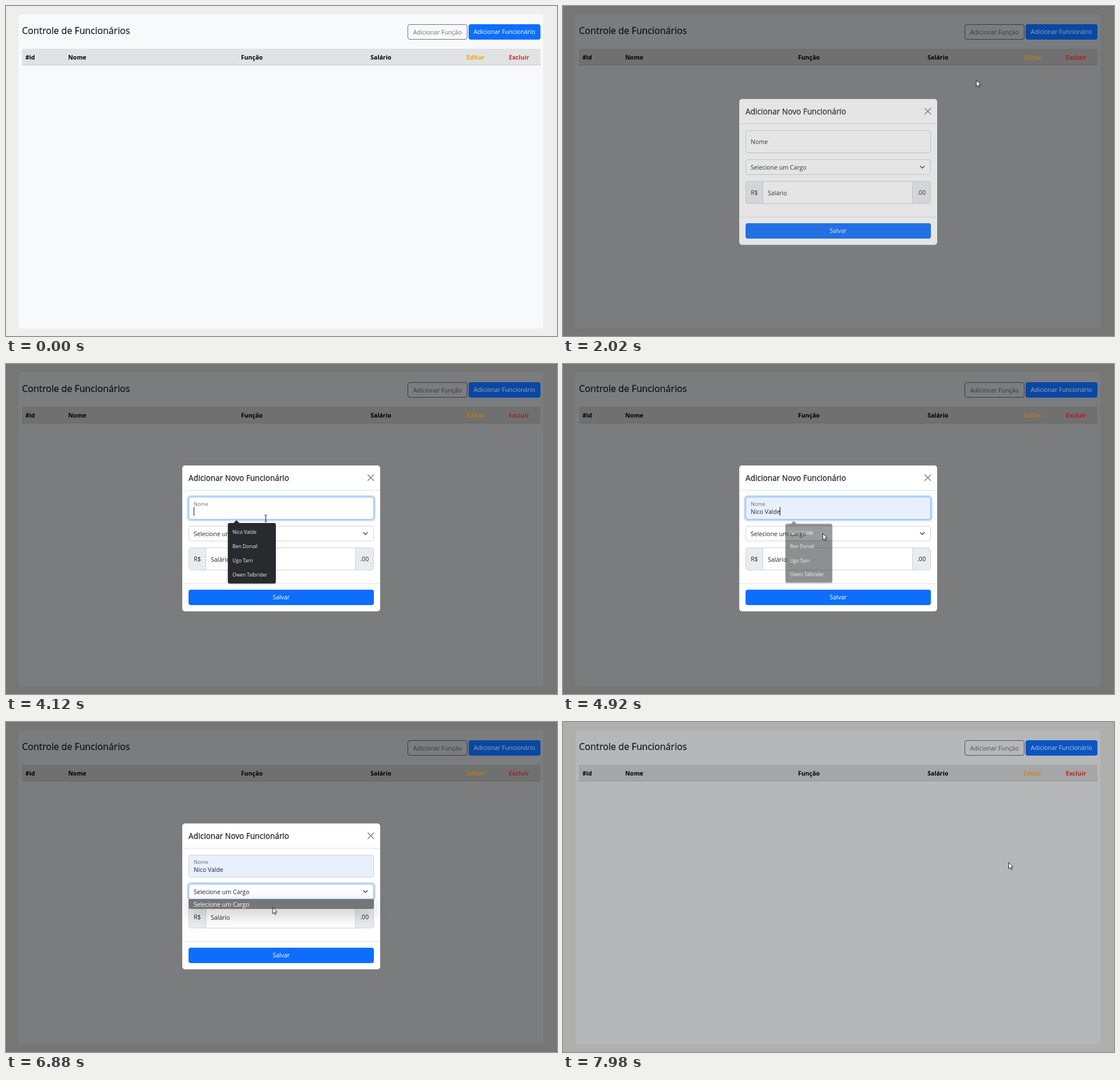
Write an HTML page that moves like this. It is 966 px wide and 579 px high and loops after 8000 ms.

```html
<!DOCTYPE html>
<html lang="pt-BR">
<head>
<meta charset="utf-8">
<title>Controle de Funcionários</title>
<style>
  html, body { margin: 0; width: 966px; height: 579px; overflow: hidden; }
  body { position: relative; background: #eee; color: #212529; font: 10.6px/20px "Open Sans", "Noto Sans", sans-serif; }
  div, span, svg { position: absolute; box-sizing: border-box; }
  svg { overflow: visible; fill: none; }

  /* Every part runs on the same 8 s clock: 1% = 80 ms */
  .anim { animation: 8s linear infinite; }
  .step { animation-timing-function: step-end; }

  /* --x: left edge, --y: middle of the line */
  .t { left: calc(var(--x) * 1px); top: calc(var(--y) * 1px - 10px); white-space: nowrap; }
  .layer { inset: 0; }
  .th { font-weight: 700; color: #000; }

  .card { left: 22px; top: 15px; width: 920px; height: 551px; border-radius: 4px; background: #f8f9fb; }
  /* A thin stroke stands in for a medium weight */
  .title, .heading { -webkit-text-stroke: .3px; }
  .title { font-size: 16.2px; }
  .heading { font-size: 13.7px; }
  .thead { left: 28px; top: 75px; width: 909px; height: 29px; background: #e1e2e3; border-bottom: 1px solid #c6c7c9; }
  .btn { border-radius: 4px; text-align: center; line-height: 27px; }
  .outline { left: 704px; top: 32px; width: 105px; height: 27px; border: 1px solid #6c757d; color: #6c757d; line-height: 26px; }
  .primary { background: #0d6efd; color: #fff; }
  .add { left: 811px; top: 32px; width: 126px; height: 27px; --dark: .65; --late: .81; }
  .save { left: 320px; top: 396px; width: 325px; height: 27px; }
  .lit { z-index: 2; animation-name: lit; }
  .edit { color: #eba624; }
  .del { color: #d6302f; }
  .edit, .del { --dark: .75; --late: .87; }

  .backdrop { z-index: 1; background: #000; animation-name: dim; }
  .modal { z-index: 3; animation-name: fade, slide; }
  .box { left: 309px; top: 178px; width: 347px; height: 256px; border-radius: 5px; background: #fff; }
  .rule { left: 309px; width: 347px; height: 1px; background: #dee2e6; }
  .field { left: 320px; width: 325px; border: 1px solid #ced4da; border-radius: 4px; background: #fff; }
  .name { top: 233px; height: 40px; }
  .select { top: 284px; height: 27px; }
  .group { top: 322px; height: 40px; overflow: hidden; }
  .addon { top: 0; height: 38px; background: #e9ecef; line-height: 39px; text-align: center; }
  .ring { background: none; border-color: #86b7fe; box-shadow: 0 0 0 2.8px rgba(13, 110, 253, .25); }
  .ring.name { animation-name: nameRing; }
  .ring.select { animation-name: selectRing; }
  .filled { background: #e8f0fe; animation-name: filled; }
  .typed { animation-name: filled; }
  .label { transform-origin: 0 50%; animation-name: label; }
  .caret { left: 329px; top: 251px; width: 1px; height: 15px; background: #111; animation-name: caret; }

  .tips { left: 389px; top: 279px; width: 84px; height: 106px; border-radius: 3px; background: #292a2d; color: #f1f3f4;
    font-size: 8.55px; box-shadow: 0 1px 3px rgba(0, 0, 0, .3); animation-name: tips; }
  .tips::before { content: ""; position: absolute; left: 9px; top: -5px; border: 6px solid transparent; border-top: 0; border-bottom-color: #292a2d; }
  .hover { left: 0; top: 4px; width: 84px; height: 25px; background: #3f4145; animation-name: hover; }
  .list { left: 320px; top: 311px; width: 325px; height: 16.5px; border-radius: 0 0 3px 3px; background: #767676; color: #fff;
    box-shadow: 0 9px 24px rgba(0, 0, 0, .25); animation-name: list; }

  .cursor { z-index: 4; left: 0; top: 0; animation-name: move; }
  .arrow { animation-name: arrow; }
  .beam { animation-name: beam; }

  @keyframes dim { 0%, 20.5% { opacity: 0 } 22.375%, 98.89% { opacity: .5 } 100% { opacity: .203 } }
  @keyframes lit {
    0%, 20.5% { filter: brightness(1) }
    22.375%, 98.89% { filter: brightness(var(--dark)) }
    100% { filter: brightness(var(--late)) }
  }
  @keyframes fade { 0%, 23.75% { opacity: 0 } 25.625%, 96.79% { opacity: 1 } 98.66%, 100% { opacity: 0 } }
  @keyframes slide {
    0% { transform: translateY(-35px) }
    23.75% { transform: translateY(-35px); animation-timing-function: ease-out }
    27.5%, 96.79% { transform: none }
    98.66%, 100% { transform: translateY(-25px) }
  }
  @keyframes nameRing { 0%, 32% { opacity: 0 } 33.875%, 69% { opacity: 1 } 70.875%, 100% { opacity: 0 } }
  @keyframes selectRing { 0%, 69.25% { opacity: 0 } 71.125%, 96% { opacity: 1 } 97.875%, 100% { opacity: 0 } }
  @keyframes label {
    0%, 32% { transform: none; opacity: 1 }
    33.25%, 100% { transform: translateY(-7.8px) scale(.86); opacity: .65 }
  }
  @keyframes filled { 0% { opacity: 0 } 51.9%, 100% { opacity: 1 } }
  @keyframes caret {
    0% { opacity: 0; transform: none }
    32.5% { opacity: 1; transform: none }
    39.5% { opacity: 0; transform: none }
    46% { opacity: 1; transform: none }
    51.9% { opacity: 0; transform: none }
    60.4% { opacity: 1; transform: translateX(51px) }
    67%, 100% { opacity: 0; transform: translateX(51px) }
  }
  @keyframes tips {
    0%, 33.75% { opacity: 0; transform: none }
    34.25%, 60.625% { opacity: 1; transform: none }
    62.5%, 100% { opacity: 0; transform: scale(.95) }
  }
  @keyframes hover { 0% { opacity: 0 } 52.5%, 100% { opacity: 1 } }
  @keyframes list { 0%, 71.6% { opacity: 0 } 73.5%, 94.5% { opacity: 1 } 95%, 100% { opacity: 0 } }
  @keyframes arrow { 0% { opacity: 0 } 4.25% { opacity: 1 } 30.6% { opacity: 0 } 51.6%, 100% { opacity: 1 } }
  @keyframes beam { 0% { opacity: 0 } 30.6% { opacity: 1 } 51.6%, 100% { opacity: 0 } }
  @keyframes move {
    0%, 4.25% { transform: translate(768px, 538px) }
    7.5% { transform: translate(802px, 370px) }
    10% { transform: translate(868px, 190px) }
    11.9% { transform: translate(897px, 95px) }
    14.125%, 16.875% { transform: translate(850px, 53px) }
    19.5%, 22.75% { transform: translate(853px, 45px) }
    25% { transform: translate(740px, 120px) }
    26.75%, 28% { transform: translate(635px, 185px) }
    31.25% { transform: translate(457px, 252px) }
    32.5%, 37.5% { transform: translate(455px, 257px) }
    39.5%, 50.625% { transform: translate(455px, 260px) }
    53.75%, 63.125% { transform: translate(455px, 297px) }
    68.125%, 69.375% { transform: translate(414px, 300px) }
    72.625% { transform: translate(412px, 313px) }
    78.75%, 79.75% { transform: translate(411px, 321px) }
    82.5% { transform: translate(350px, 318px) }
    89.75%, 90% { transform: translate(592px, 332px) }
    94%, 100% { transform: translate(781px, 246px) }
  }
</style>
</head>
<body>
  <div class="card"></div>
  <span class="t title" style="--x:28;--y:42.5">Controle de Funcionários</span>
  <div class="btn outline">Adicionar Função</div>
  <div class="btn primary add lit anim">Adicionar Funcionário</div>
  <div class="thead"></div>
  <span class="t th" style="--x:34;--y:89.5">#id</span>
  <span class="t th" style="--x:109;--y:89.5">Nome</span>
  <span class="t th" style="--x:412;--y:89.5">Função</span>
  <span class="t th" style="--x:639;--y:89.5">Salário</span>
  <span class="t th edit lit anim" style="--x:807.5;--y:89.5">Editar</span>
  <span class="t th del lit anim" style="--x:881.5;--y:89.5">Excluir</span>

  <div class="layer backdrop anim"></div>

  <div class="layer modal anim">
    <div class="box"></div>
    <span class="t heading" style="--x:320;--y:200">Adicionar Novo Funcionário</span>
    <svg style="left:634px;top:194px" width="11" height="11" stroke="#7f7f7f" stroke-width="1.5" stroke-linecap="round"><path d="M.5.5l10 10m0-10l-10 10"/></svg>
    <div class="rule" style="top:221px"></div>

    <div class="field name"></div>
    <div class="field name filled anim step"></div>
    <div class="field name ring anim"></div>
    <span class="t label anim" style="--x:329;--y:253">Nome</span>
    <span class="t typed anim step" style="--x:329;--y:259">Nico Valde</span>
    <div class="caret anim step"></div>

    <div class="field select"></div>
    <div class="field select ring anim"></div>
    <span class="t" style="--x:329;--y:298">Selecione um Cargo</span>
    <svg style="left:626px;top:295px" width="8" height="5" stroke="#343a40" stroke-width="1.3" stroke-linecap="round" stroke-linejoin="round"><path d="M.5.7L4 4.2 7.5.7"/></svg>

    <div class="field group">
      <div class="addon" style="left:0;width:30px;border-right:1px solid #ced4da">R$</div>
      <div class="addon" style="right:0;width:32px;border-left:1px solid #ced4da">.00</div>
    </div>
    <span class="t" style="--x:359;--y:342.5">Salário</span>
    <div class="rule" style="top:384.5px"></div>
    <div class="btn primary save">Salvar</div>

    <div class="tips anim">
      <div class="hover anim step"></div>
      <span class="t" style="--x:8;--y:16">Nico Valde</span>
      <span class="t" style="--x:8;--y:41">Ben Dorval</span>
      <span class="t" style="--x:8;--y:66">Ugo Tarn</span>
      <span class="t" style="--x:8;--y:91">Owen Talbrider</span>
    </div>
    <div class="list anim"><span class="t" style="--x:9;--y:8.5">Selecione um Cargo</span></div>
  </div>

  <div class="cursor anim">
    <svg class="arrow anim step" width="9" height="14"><path d="M.4.4v11.2l2.5-2.3 1.7 3.9 1.8-.8-1.7-3.8h3.4z" fill="#fff" stroke="#111" stroke-width=".9" stroke-linejoin="round"/></svg>
    <svg class="beam anim step" width="6" height="13" stroke="#111"><path d="M-2-5.5h1.5l1 .7 1-.7H3M.5-5V5.5M-2 6h1.5l1-.7 1 .7H3"/></svg>
  </div>
</body>
</html>
```
